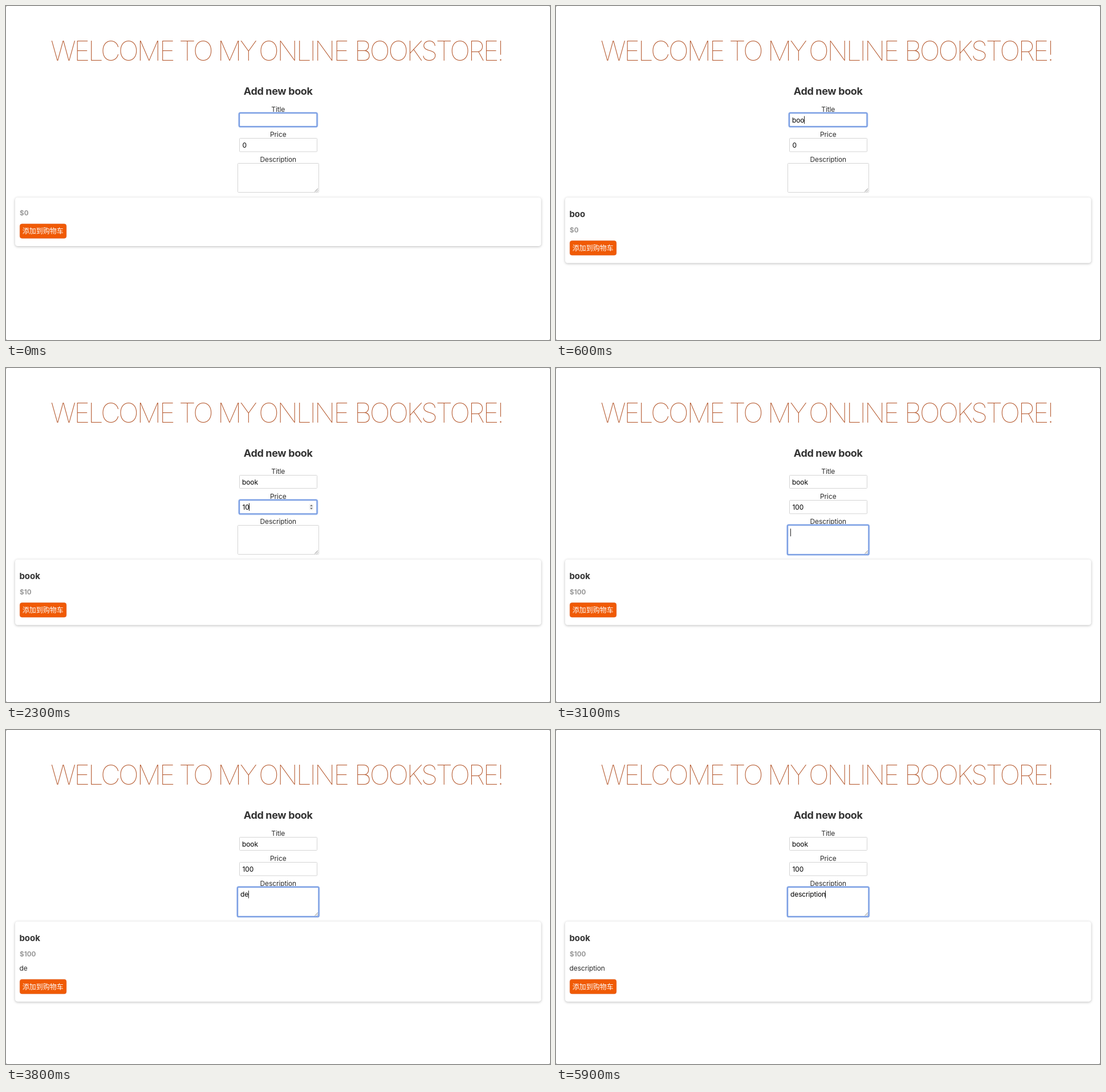
Animation, 954 px wide and 587 px high, one loop 6 s. Source, as an HTML page:

```html
<!DOCTYPE html>
<html lang="en">
<head>
<meta charset="utf-8">
<title>Online bookstore</title>
<style>
  html, body { margin: 0; width: 100%; height: 100%; overflow: hidden; background: #fff; }
  svg { display: block; width: 100vw; height: 100vh; }
  text { font: 12px Inter, "Open Sans", sans-serif; font-optical-sizing: none; fill: #2c2c2c; white-space: pre; }
  .mid { text-anchor: middle; }
  .hero text { font-size: 47.8px; font-weight: 100; letter-spacing: -3.4px; fill: #b4572c; text-anchor: middle; }
  .heading { font-size: 18px; font-weight: 700; letter-spacing: -.35px; fill: #333; }
  .label { letter-spacing: -.12px; }
  .field { fill: #fff; stroke: #d4d4d4; }
  .value { fill: #000; font-weight: 430; letter-spacing: -.15px; }
  .ring { fill: none; stroke: #7c9fe3; stroke-width: 2.2; }
  .glow { fill: none; stroke: #a9c3f2; stroke-width: 3.4; opacity: .6; }
  .card { fill: #fff; filter: drop-shadow(0 1px 2px rgba(0, 0, 0, .27)); }
  .name { font-size: 15px; font-weight: 700; fill: #333; }
  .cost { font-size: 11.7px; font-weight: 700; fill: #999; }
  .buy rect { fill: #f05a05; stroke: #dc6430; stroke-width: .6; }
  .buy text { font-family: "Noto Sans CJK SC", "Noto Sans CJK", sans-serif; font-weight: 500; fill: #fff; }
</style>
</head>
<body>
<svg viewBox="0 0 954 587" preserveAspectRatio="none">
  <rect width="954" height="587" fill="#777"/>
  <rect width="954" height="587" rx="2" fill="#fff"/>
  <g class="hero">
    <text x="185.8" y="96">WELCOME</text>
    <text x="331.8" y="96">TO</text>
    <text x="404" y="96">MY</text>
    <text x="520.8" y="96">ONLINE</text>
    <text x="740.6" y="96">BOOKSTORE!</text>
  </g>
  <text class="mid heading" x="477.2" y="155.5">Add new book</text>
  <text class="mid label" x="477.3" y="185.5">Title</text>
  <text class="mid label" x="477.3" y="229.5">Price</text>
  <text class="mid label" x="477.3" y="273.7">Description</text>

  <rect class="field" x="409.5" y="188.5" width="136" height="23" rx="1"/>
  <rect class="field" x="409.5" y="232.5" width="136" height="23.5" rx="1"/>
  <rect class="field" x="406.5" y="276.5" width="142" height="51" rx="1"/>
  <path d="M541.5 326.5l5.5-5.5M544.7 326.5l2.3-2.3" stroke="#777" stroke-width=".9"/>
  <g id="spinner">
    <rect x="531.5" y="238.5" width="8" height="11.5" rx="2" fill="#f3f3f3"/>
    <path d="M533.2 243l2.3-2.8 2.3 2.8zM533.2 245.8l2.3 2.8 2.3-2.8z" fill="#6a6a6a"/>
  </g>
  <rect id="glow" class="glow" rx="2.5"/>
  <rect id="ring" class="ring" rx="1.8"/>
  <text id="title" class="value" x="414.1" y="204.5"></text>
  <text id="price" class="value" x="414.5" y="249"></text>
  <text id="notes" class="value" x="411.1" y="293.4"></text>
  <rect id="caret" width="1" height="13.5" fill="#222"/>

  <rect id="card" class="card" x="16" y="336.5" width="922.5" rx="4.5"/>
  <text id="cardName" class="name" x="23.4" y="371.2"></text>
  <text id="cardCost" class="cost" x="24"></text>
  <text id="cardNotes" class="label" x="23.6" y="423.3"></text>
  <g id="buy" class="buy">
    <rect x="24.3" y=".3" width="81.6" height="25.4" rx="3.8"/>
    <text x="28.8" y="17.5">添加到购物车</text>
  </g>
</svg>
<script>
const LOOP = 6000;
const $ = id => document.getElementById(id);

// Each track is a list of [start time, value].
const tracks = {
  title: [[0, ""], [100, "b"], [400, "bo"], [600, "boo"], [800, "book"]],
  price: [[0, "0"], [1900, ""], [2100, "1"], [2300, "10"], [2400, "100"]],
  notes: [[0, ""], [3600, "d"], [3700, "de"], [3900, "des"], [4000, "desc"],
    [4900, "descr"], [5100, "descri"], [5200, "descrip"], [5500, "descript"],
    [5600, "descripti"], [5700, "descriptio"], [5900, "description"]],
  focus: [[0, "title"], [1500, "price"], [3100, "notes"]],
  caret: [[0, false], [100, true], [1300, false], [1500, true], [2900, false],
    [3100, true], [4500, false], [4900, true]],
  spinner: [[0, false], [1100, true], [3100, false]]
};

// Focus box and caret top of each field.
const boxes = {
  title: [409, 188, 136.5, 24, 193.5],
  price: [409, 232, 136.5, 24.5, 237.5],
  notes: [406, 276, 142.5, 52, 282.3]
};

const at = (name, t) => tracks[name].filter(([start]) => start <= t).pop()[1];

function set(el, attrs) {
  for (const key in attrs) el.setAttribute(key, attrs[key]);
}

function write(id, text) {
  if ($(id).textContent !== text) $(id).textContent = text;
}

function show(id, on) {
  $(id).style.visibility = on ? "visible" : "hidden";
}

function draw(t) {
  const title = at("title", t), price = at("price", t), notes = at("notes", t);
  write("title", title);
  write("price", price);
  write("notes", notes);
  write("cardName", title);
  write("cardCost", "$" + price);
  write("cardNotes", notes);

  const focus = at("focus", t);
  const [x, y, width, height, caretY] = boxes[focus];
  set($("ring"), { x, y, width, height });
  set($("glow"), { x: x - .3, y: y - .3, width: width + .6, height: height + .6 });
  const field = $(focus);
  const end = field.textContent ? field.getComputedTextLength() : 0;
  set($("caret"), { x: Math.floor(+field.getAttribute("x") + end), y: caretY });
  show("caret", at("caret", t));
  show("spinner", at("spinner", t));

  // The card grows by one row for the title and one for the description.
  const nameRow = title ? 29.7 : 0, notesRow = notes ? 25.7 : 0;
  set($("card"), { height: 85.5 + nameRow + notesRow });
  set($("cardCost"), { y: 368.2 + nameRow });
  set($("buy"), { transform: `translate(0 ${382.6 + nameRow + notesRow})` });
}

function tick() {
  draw(performance.now() % LOOP);
  requestAnimationFrame(tick);
}
tick();
</script>
</body>
</html>
```
